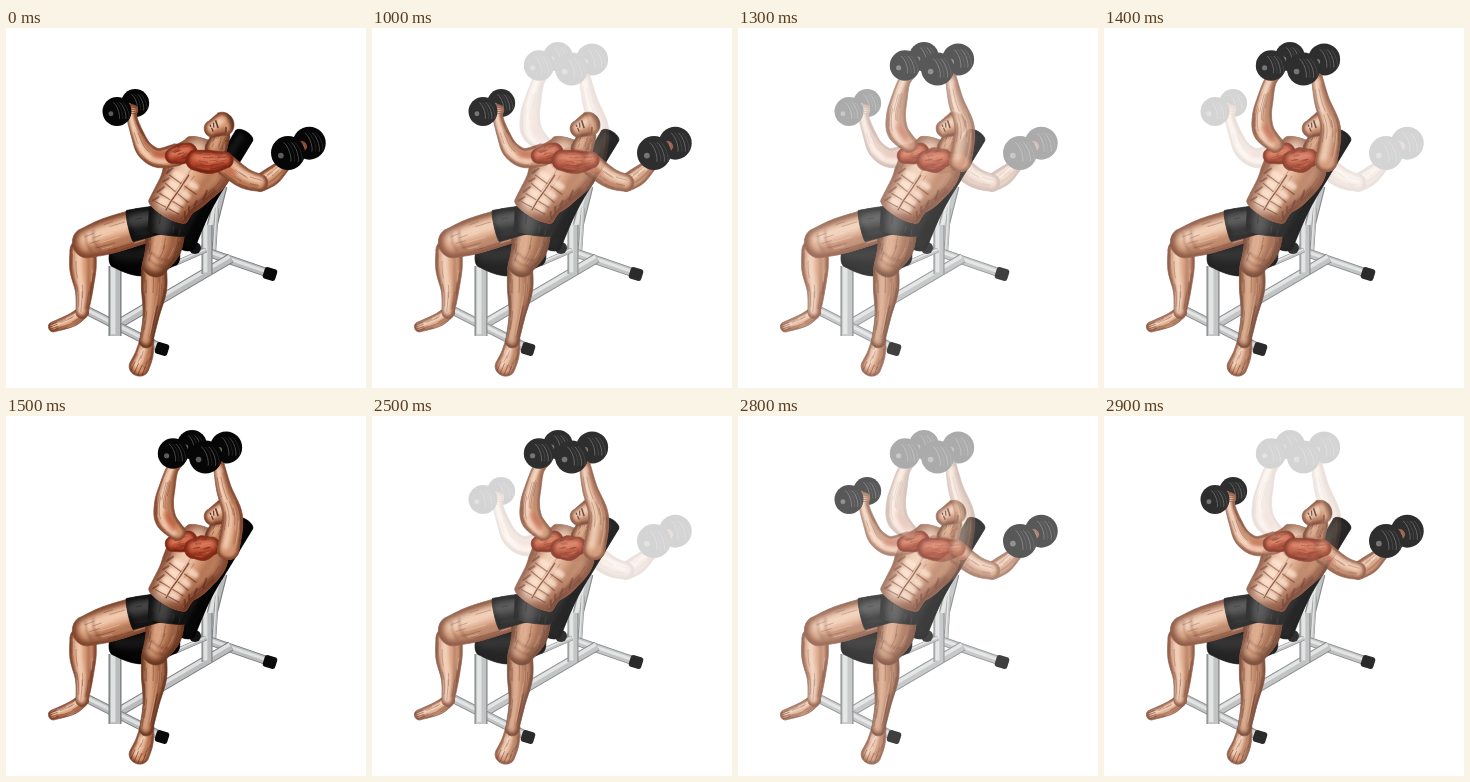
An HTML page with a canvas that plays this animation: 360 px wide and 360 px high, repeating every 3 s.

```html
<!DOCTYPE html>
<html lang="en">
<head>
<meta charset="utf-8">
<title>Incline dumbbell fly</title>
<style>
html, body { margin: 0; width: 100%; height: 100%; overflow: hidden; background: #fff; }
canvas { display: block; width: 100vw; height: 100vh; }
</style>
</head>
<body>
<canvas id="stage" width="360" height="360"></canvas>
<script>
const SIZE = 360;
const SKIN = { base: '#d2936e', dark: '#5a2211', light: '#ffe3cd', flow: 12 };
const SHADED = { base: '#b57552', dark: '#451a0c', light: '#eab797', flow: 16 };
const MUSCLE = { base: '#b8482c', dark: '#5c150a', light: '#e58a68', flow: 26 };
const CLOTH = { base: '#242424', dark: '#060606', light: '#565656', flow: 5, cap: .12 };
const PADDING = { base: '#080808', dark: '#000', light: '#1c1c1c', flow: 0, cap: .5 };

let g, seed;
const random = () => (seed = seed * 16807 % 2147483647) / 2147483647;
const range = n => Array.from({ length: n }, (_, i) => i);

// Tube of varying radius along key points [x, y, r].
// at(t, u) runs t along it and u across it, from -1 to 1.
function ribbon(keys, cap) {
  const n = keys.length - 1;
  const key = i => keys[Math.max(0, Math.min(n, i))];
  const centre = t => {
    const i = Math.max(0, Math.min(n - 1, Math.floor(t * n))), f = t * n - i;
    return [0, 1, 2].map(k => {
      const [a, b, c, d] = [key(i - 1)[k], key(i)[k], key(i + 1)[k], key(i + 2)[k]];
      const m = (c - a) / 2, q = (d - b) / 2;
      return b + f * (m + f * (3 * (c - b) - 2 * m - q + f * (2 * (b - c) + m + q)));
    });
  };
  const at = (t, u, ahead = 0) => {
    const [x, y, r] = centre(t), a = centre(t - .01), b = centre(t + .01);
    const turn = Math.atan2(b[1] - a[1], b[0] - a[0]);
    const c = Math.cos(turn) * r, s = Math.sin(turn) * r;
    return [x - s * u + c * ahead, y + c * u + s * ahead];
  };
  const side = range(33).map(i => i / 32);
  const arc = range(13).map(i => i / 12 * Math.PI);
  const outline = [
    ...side.map(t => at(t, 1)),
    ...arc.map(a => at(1, Math.cos(a), cap * Math.sin(a))),
    ...side.map(t => at(1 - t, -1)),
    ...arc.map(a => at(0, -Math.cos(a), -cap * Math.sin(a)))
  ];
  const path = new Path2D();
  outline.forEach(p => path.lineTo(...p));
  path.closePath();
  return { at, path, radius: centre(.5)[2] };
}

function stroke(path, color, width, alpha = 1, blur = 0) {
  g.save();
  g.globalAlpha = alpha;
  if (blur) g.filter = `blur(${blur}px)`;
  g.strokeStyle = color;
  g.lineWidth = width;
  g.lineCap = 'round';
  g.stroke(path);
  g.restore();
}

function line(points, ...style) {
  const path = new Path2D();
  points.forEach(p => path.lineTo(...p));
  stroke(path, ...style);
}

// Shaded body part: dark rim, soft light, then fine streaks along its length
function limb(keys, look = SKIN, details) {
  const { base, dark, light, flow, cap = .9 } = look;
  const shape = ribbon(keys, cap), { at, path, radius: r } = shape;
  const along = (from, to, u) => range(9).map(i => at(from + (to - from) * i / 8, u));
  const lit = at(.5, 1)[0] + 2 * at(.5, 1)[1] < at(.5, -1)[0] + 2 * at(.5, -1)[1] ? 1 : -1;
  stroke(path, dark, 1, .6);
  g.save();
  g.fillStyle = base;
  g.fill(path);
  g.clip(path);
  stroke(path, dark, r * .55, .7, r * .16);
  line(along(.05, .95, lit * .3), light, r * .65, .75, r * .2);
  line(along(.1, .9, -lit * .45), dark, r * .25, .3, r * .12);
  range(flow).forEach(i => {
    const u = random() * 1.7 - .85, t = random() * .75;
    line(along(t, t + .12 + random() * .25, u), i % 3 ? dark : light, .8, .4);
  });
  if (details) details(at);
  g.restore();
  return shape;
}

function tube(x0, y0, x1, y1, w) {
  [['#77797b', 1, 0], ['#b9bbbc', .8, 0], ['#dfe0e0', .35, -.14]].forEach(([color, k, shift]) => {
    g.strokeStyle = color;
    g.lineWidth = w * k;
    g.beginPath();
    g.moveTo(x0 + w * shift, y0 + w * shift);
    g.lineTo(x1 + w * shift, y1 + w * shift);
    g.stroke();
  });
}

function disc(x, y, r, fill) {
  g.fillStyle = fill;
  g.beginPath();
  g.arc(x, y, r, 0, 7);
  g.fill();
}

function rubber(x, y) {
  g.save();
  g.translate(x, y);
  g.rotate(.3);
  g.fillStyle = '#0a0a0a';
  g.beginPath();
  g.roundRect(-6.5, -6, 13, 12, 3);
  g.fill();
  g.restore();
}

function bench() {
  tube(216, 158, 200, 222, 11);
  tube(211, 180, 208, 226, 4);
  tube(204, 225, 262, 245, 9);
  tube(225, 230, 116, 294, 10);
  tube(201, 197, 201, 246, 11);
  tube(168, 236, 200, 222, 5);
  tube(82, 283, 153, 319, 9);
  tube(109, 238, 109, 308, 13);
  rubber(264, 246);
  rubber(156, 321);
  disc(189, 220, 6, '#111');
  limb([[238, 108, 10], [221, 136, 10], [196, 176, 11], [176, 214, 14]], PADDING);
  limb([[108, 229, 10], [135, 231, 17], [165, 222, 16]], PADDING);
}

function toes(at) {
  range(4).forEach(i => {
    const u = i * .4 - .6;
    line([at(.85, u), at(1, u, .8)], SKIN.dark, .8, .7);
  });
}

function knee(at) {
  [.78, .98].forEach(t =>
    line([-.6, 0, .6].map(u => at(t - .1 * Math.abs(u), u)), SKIN.dark, 1.8, .35, .8));
}

function legs() {
  limb([[77, 284, 6], [66, 292, 6.5], [47, 299, 5]], SKIN, toes);
  limb([[77, 222, 13], [77, 242, 13], [78, 264, 8.5], [76, 285, 6]]);
  limb([[135, 198, 18], [102, 208, 18], [80, 215, 15]], SKIN, knee);
  limb([[141, 312, 7], [138, 327, 9], [133, 339, 10]], SKIN, toes);
  limb([[148, 240, 12.5], [148, 262, 12.5], [145, 288, 8], [140, 314, 6.5]], SHADED);
  limb([[160, 203, 19], [157, 220, 18], [149, 237, 13]], SHADED, knee);
  limb([[160, 190, 14], [124, 198, 16]], CLOTH);
  limb([[164, 183, 21], [161, 205, 19]], CLOTH);
}

function abdomen(at) {
  const { dark, light } = SKIN;
  range(4).forEach(row => {
    const t = .46 + row * .14;
    [-1, 1].forEach(s => {
      const across = (t, a, b) => [a, (a + b) / 2, b].map(u => at(t, .1 + s * u));
      line(across(t, .2, .4), light, 7, .75, 1.5);
      line(across(t + .06, .08, .6), dark, 1.1, .6, .3);
      line([at(t - .03, s * .68), at(t + .06, s * .82)], dark, 2, .5, .6);
    });
  });
  line([.4, .6, .8, 1].map(t => at(t, .1)), dark, 1.3, .7, .3);
  line([.4, .7, 1].map(t => at(t, -.85)), dark, 5, .5, 1.5);
}

function torso(chest) {
  limb([[200, 118, 21], [193, 136, chest], [180, 157, 28], [169, 171, 23], [162, 183, 22]],
    { ...SKIN, cap: .3 }, abdomen);
}

function head() {
  limb([[215, 108, 9], [210, 121, 11]], SHADED);
  limb([[217, 96, 12], [206, 101, 8.5]], { ...SKIN, flow: 0 }, at => {
    const feature = (t, u, t2, u2, w) => line([at(t, u), at(t2, u2)], '#3a160b', w, .8, .3);
    line([at(0, -.6, -.7), at(0, .5, -.8)], '#4a2a1c', 6, .6, 1.5);
    feature(.45, .55, .5, -.1, 1.6);
    feature(.65, .5, .75, .1, 1.2);
    feature(1, .35, 1, .5, 1.3);
    feature(1, -.3, 1, .1, 1.2);
    line([at(.2, -.75), at(1, -.85)], SKIN.dark, 3, .5, 1);
    line([at(0, -.4, -.1), at(.1, -.7)], SKIN.dark, 2, .6, .4);
  });
}

function plate(x, y, r) {
  disc(x, y, r, '#060606');
  range(4).forEach(i => {
    g.strokeStyle = i % 2 ? '#222' : '#484848';
    g.lineWidth = 1;
    g.beginPath();
    g.ellipse(x + r * (i * .22 - .2), y, r * .3, r * .72, -.35, -1, 1);
    g.stroke();
  });
  disc(x - r * .42, y + r * .15, r * .17, '#5c5c5c');
}

// The gripping arm passes between the two ends
function dumbbell(x, y, r, arm) {
  plate(x + r * 1.25, y - r * .58, r * .97);
  arm();
  plate(x, y, r);
}

function grip(at) {
  range(4).forEach(i => line([at(1, -.9, i * .35 - .6), at(1, .5, i * .35 - .6)], SKIN.dark, .8, .6));
}

const flush = at => line([at(.08, 0), at(.25, .2)], '#c04a2c', 6, .6, 2);
const leftPec = () => limb([[166, 128, 7.5], [175, 126, 10], [183, 124, 9]], MUSCLE);

function armsOpen() {
  dumbbell(111, 83.5, 14.5, () =>
    limb([[170, 127, 11], [152, 130, 9.5], [139, 122, 8.5], [132, 108, 6.5], [126, 90, 5], [126, 82, 6]],
      SKIN, at => { flush(at); grip(at); }));
  dumbbell(282, 125, 17, () => {
    limb([[254, 155, 8.5], [266, 148, 9], [279, 136, 6.5], [296, 118, 5]], SKIN, grip);
    limb([[220, 137, 11], [238, 150, 10], [254, 155, 8.5]], SKIN, flush);
  });
  leftPec();
  limb([[189, 132, 10], [204, 134, 11.5], [220, 132, 8]], MUSCLE);
}

function armsUp() {
  leftPec();
  limb([[187, 133, 9.5], [197, 132, 12.5], [206, 130, 9]], MUSCLE);
  dumbbell(167, 37.5, 15.2, () =>
    limb([[172, 117, 8], [160, 104, 10.5], [158, 88, 9.5], [161, 72, 8], [166, 54, 6], [173, 44, 6]],
      SKIN, flush));
  dumbbell(199.5, 41, 16.5, () =>
    limb([[222, 134, 11], [226, 113, 10.5], [226, 96, 9.5], [218, 73, 7.5], [213, 50, 5.5]]));
}

function render(chest, arms) {
  const c = document.createElement('canvas');
  c.width = c.height = SIZE;
  g = c.getContext('2d');
  seed = 41;
  bench();
  legs();
  torso(chest);
  head();
  arms();
  return c;
}

const open = render(34, armsOpen), up = render(31, armsUp);
const view = document.getElementById('stage').getContext('2d');

// Share of the raised pose; the fades advance in sixths every 100 ms
function raised(t) {
  const step = start => (Math.floor((t - start) / 100) + 1) / 6;
  if (t < 1000) return 0;
  if (t < 1500) return step(1000);
  if (t < 2500) return 1;
  return 1 - step(2500);
}

function draw(now) {
  const k = raised(now % 3000);
  view.globalAlpha = 1;
  view.fillStyle = '#fff';
  view.fillRect(0, 0, SIZE, SIZE);
  [[open, 1 - k], [up, k]].forEach(([pose, share]) => {
    view.globalAlpha = share;
    view.drawImage(pose, 0, 0);
  });
}

let begin;
function tick(now) {
  begin ??= now;
  draw(now - begin);
  requestAnimationFrame(tick);
}
draw(0);
requestAnimationFrame(tick);
</script>
</body>
</html>
```
